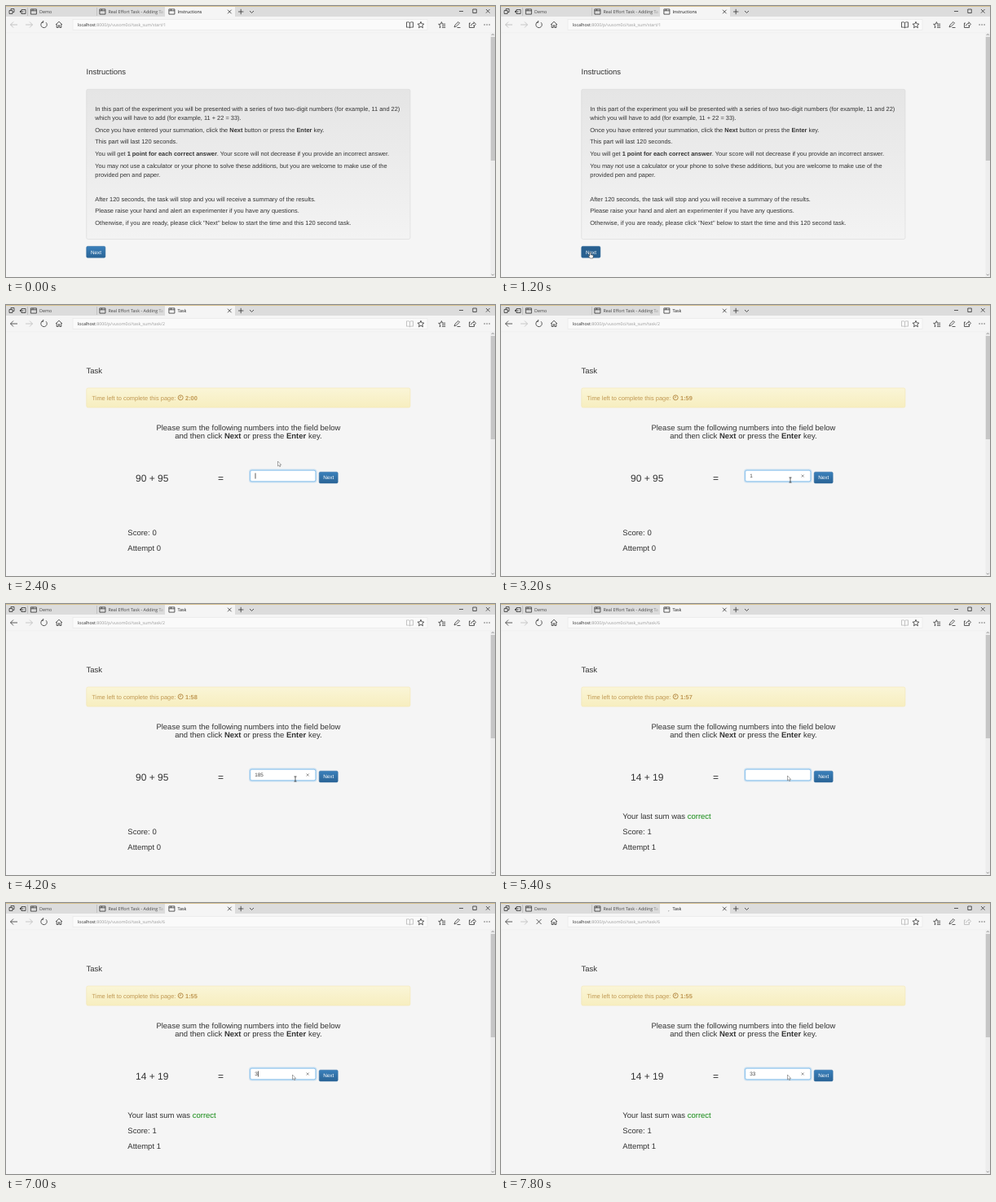
Animation, 600 px wide and 333 px high, one loop 8 s. Source, as an HTML page:

```html
<!DOCTYPE html>
<html lang="en">
<head>
<meta charset="utf-8">
<title>Adding task</title>
<style>
html, body { margin: 0; width: 100%; height: 100%; overflow: hidden; background: #f5f5f5; }
svg { display: block; width: 100vw; height: 100vh; }
text { font: 7.43px "Liberation Sans", Arial, sans-serif; fill: #333; text-rendering: geometricPrecision; white-space: pre; }
b, .b { font-weight: bold; }
.big { font-size: 9.5px; }
.sum { font-size: 12px; }
.small { font-size: 6.37px; }
.ui { font: 5.4px "Open Sans", "Noto Sans", sans-serif; fill: #444; }
.mid { text-anchor: middle; }
.line { fill: none; stroke: #333; stroke-width: .8; }
.pale { stroke: #bbb; }
.tan { fill: #c09853; }
</style>
</head>
<body>
<svg viewBox="0 0 600 333">
<defs>
  <linearGradient id="well" x2="0" y2="1"><stop stop-color="#e5e5e5"/><stop offset="1" stop-color="#f3f3f3"/></linearGradient>
  <linearGradient id="alert" x2="0" y2="1"><stop stop-color="#faf5d7"/><stop offset="1" stop-color="#f7eebf"/></linearGradient>
  <linearGradient id="blue" x2="0" y2="1"><stop stop-color="#3a80bb"/><stop offset="1" stop-color="#2a6496"/></linearGradient>
  <linearGradient id="fade" x2="1" y2="0"><stop stop-color="#dcdcdc" stop-opacity="0"/><stop offset="1" stop-color="#dcdcdc"/></linearGradient>
  <path id="sheet" class="line" d="M.4.4h7v6.2h-7zM.4 2.3h7M3 .4v1.9"/>
</defs>

<rect width="600" height="333" fill="#f5f5f5"/>

<!-- browser frame -->
<rect width="600" height="13" fill="#dcdcdc"/>
<rect x="195" width="86" height="14" fill="#f5f5f5"/>
<rect width="600" height="1" fill="#d5c090"/>
<path class="line pale" d="M26.5 2v10M111.5 2v10" stroke-width=".5"/>
<path class="line" d="M4 5.5h4v4h-4zM6 5.5v-2h4v4h-2M17 6.5h2v-2h5v5h-5v-1.500M21.500 7h-4.500l1.500-1.500M17 7l1.500 1.500" stroke-width=".7"/>
<use href="#sheet" x="30" y="3.500"/>
<use href="#sheet" x="114.500" y="3.500"/>
<use href="#sheet" x="199.500" y="3.500" id="tabIcon"/>
<path id="spinner" class="line" stroke-width="1"/>
<text class="ui" x="41" y="9">Demo</text>
<text class="ui" x="125.500" y="9">Real Effort Task - Adding Ta</text>
<rect x="185" y="2" width="10" height="10" fill="url(#fade)"/>
<text class="ui" x="210.500" y="9" id="tab" style="fill:#111"></text>
<path class="line" d="M272 4.700l4.600 4.600m0-4.600l-4.600 4.600M285 7h6.400M288.200 3.800v6.400M299 6l2.500 2.500l2.500-2.500M556 6.500h5M572.800 4h4.500v4.500h-4.500zM589 4l4.600 4.600m0-4.600l-4.600 4.600" stroke-width=".7"/>
<rect x="82" y="16.500" width="435" height="13" fill="#fafafa" stroke="#e6e6e6" stroke-width=".6"/>
<text class="ui" x="88" y="25" style="font-size:5.220px;fill:#999"><tspan fill="#222">localhost</tspan><tspan id="url"></tspan></text>
<path id="back" class="line" d="M14 23H5.500l3.500-3.500M5.500 23l3.500 3.500"/>
<path class="line pale" d="M24 23h8.500l-3.500-3.500M32.500 23l-3.500 3.500"/>
<path id="reload" class="line" d="M49 20.200a3.700 3.700 0 1 1-4 -.6M45.700 18v2.300h-2.300"/>
<path id="stop" class="line" d="M43.500 20l6 6m0-6l-6 6" stroke-width="1"/>
<path class="line" d="M61 23l4-3.800l4 3.800M62.200 22.200v4.300h2v-2.700h1.600v2.700h2v-4.300"/>
<path id="book" class="line" d="M495.500 20.500c-1-.8-2.500-.8-4-.6v6.300c1.500-.2 3-.2 4 .6c1-.8 2.500-.8 4-.6v-6.300c-1.500-.2-3-.2-4 .6zv6.300"/>
<path class="line" d="M509 19.300l1.100 2.600l2.800.2l-2.100 1.900l.7 2.800l-2.500-1.500l-2.500 1.500l.7-2.800l-2.100-1.900l2.800-.2zM533.500 26l-1.400.8l.6-2.700l-2-1.700l2.700-.2l1-2.600l1 2.400M535 22.200h4.200M535 24.300h4.200M535 26.400h4.200M550 26l1-2.700l4-3.800l1.600 1.600l-4 3.800zM553.500 26.500h4"/>
<path id="share" class="line" d="M570 21h-1.500v5.500h6v-2M570.500 24.500c.3-2.300 1.700-3 3.500-3v-1.800l2.500 2.700l-2.500 2.600v-1.700"/>
<path d="M586.500 22.600h1.200v1h-1.200zm3 0h1.200v1h-1.200zm3 0h1.200v1h-1.200z" fill="#333"/>
<path d="M0 33H600" stroke="#ececec" stroke-width=".6"/>
<rect x="594.500" y="33" width="5.500" height="300" fill="#ededed"/>
<path class="line" d="M595.800 36l1.500-1.500l1.500 1.500M595.800 329.500l1.500 1.500l1.500-1.500" stroke-width=".6" style="stroke:#777"/>
<rect id="thumb" x="594.800" y="38" width="5.200" fill="#c6c6c6"/>

<text class="big" id="title" x="98.500" y="83.500"></text>

<g id="intro">
  <rect x="98.700" y="102.300" width="397.300" height="184.200" rx="2" fill="url(#well)" stroke="#d9d9d9" stroke-width=".6"/>
  <g id="copy"></g>
  <rect id="start" x="98.700" y="295.300" width="23.200" height="14" rx="1.600" stroke="#2b669a" stroke-width=".5"/>
  <text class="small" x="103.900" y="304.600" style="fill:#fff">Next</text>
</g>

<g id="task">
  <rect x="98.700" y="102" width="397.300" height="24" rx="2" fill="url(#alert)" stroke="#f3e6b8" stroke-width=".6"/>
  <text class="tan" x="105.500" y="116.800" style="fill:#c09853">Time left to complete this page:</text>
  <circle cx="214.200" cy="113.800" r="3" class="line" style="stroke:#b98f4a;stroke-width:1"/>
  <path d="M214.200 111.800v2.200h-1.600" class="line" style="stroke:#b98f4a"/>
  <text id="clock" class="b" x="220" y="116.800" style="fill:#c09853"></text>
  <text class="big mid" x="297.400" y="153.800">Please sum the following numbers into the field below</text>
  <text class="big mid" x="297.400" y="164.300">and then click <tspan class="b">Next</tspan> or press the <tspan class="b">Enter</tspan> key.</text>
  <text id="sum" class="sum" x="159" y="217.300"></text>
  <text class="sum" x="260" y="217.300">=</text>
  <rect x="299" y="202.500" width="81.500" height="15" rx="2.500" fill="none" stroke="#66afe9" stroke-opacity=".3" stroke-width="2"/>
  <rect x="299.700" y="203.200" width="80.200" height="13.600" rx="2" fill="#fff" stroke="#66afe9" stroke-width=".7"/>
  <text id="field" class="small" x="305.300" y="212.200" style="fill:#444"></text>
  <path id="caret" class="line" d="M0 206.500v7" stroke-width=".7"/>
  <path id="clear" class="line" d="M368.700 208.500l3 3m0-3l-3 3" stroke-width=".6" style="stroke:#777"/>
  <rect x="384.200" y="205.200" width="23" height="13.800" rx="1.600" fill="url(#blue)" stroke="#2b669a" stroke-width=".5"/>
  <text class="small" x="389.200" y="214.300" style="fill:#fff">Next</text>
  <text id="verdict" class="big" x="149.300" y="263.800">Your last sum was <tspan fill="#148a14">correct</tspan></text>
  <text id="score" class="big" x="149.300" y="283"></text>
  <text id="attempt" class="big" x="149.300" y="301.800"></text>
  <g id="tip">
    <rect x="296" y="217.200" width="72" height="17.300" fill="#fff" stroke="#555" stroke-width=".8"/>
    <text class="ui" x="300.300" y="228" style="font-size:5.950px">This is a required field</text>
  </g>
</g>

<g id="mouse">
  <path id="arrow" d="M0 0v6l1.400-1.200l.9 2l1-.5l-.9-1.900h1.800z" fill="#fff" stroke="#555" stroke-width=".5"/>
  <path id="beam" class="line" d="M-1.500-3h3M0-3v6M-1.500 3h3" stroke-width=".7"/>
  <path id="hand" d="M-.7 0q.7-.8 1.400 0v2.600l2.600.6q.6.200.5 1l-.6 2.800h-3.400l-2.200-3q.2-.9 1.700.2z" fill="#fff" stroke="#222" stroke-width=".5"/>
</g>
</svg>
<script>
const LOOP = 8000, STEP = 200;
const el = id => document.getElementById(id);
const show = (id, on) => { el(id).style.display = on ? "" : "none"; };
const put = (id, s) => { el(id).textContent = s; };
const ink = (id, on) => { el(id).style.stroke = on ? "#333" : "#b5b5b5"; };

// [baseline, text]; asterisks mark bold
const copy = [
  [129.4, "In this part of the experiment you will be presented with a series of two two-digit numbers (for example, 11 and 22)"],
  [139.9, "which you will have to add (for example, 11 + 22 = 33)."],
  [154.600, "Once you have entered your summation, click the *Next* button or press the *Enter* key."],
  [169.400, "This part will last 120 seconds."],
  [184.300, "You will get *1 point for each correct answer*. Your score will not decrease if you provide an incorrect answer."],
  [199.100, "You may not use a calculator or your phone to solve these additions, but you are welcome to make use of the"],
  [209.700, "provided pen and paper."],
  [239.600, "After 120 seconds, the task will stop and you will receive a summary of the results."],
  [254.400, "Please raise your hand and alert an experimenter if you have any questions."],
  [269.200, "Otherwise, if you are ready, please click \"Next\" below to start the time and this 120 second task."]
];
el("copy").innerHTML = copy.map(([y, s]) =>
  `<text x="109.3" y="${y}">${s.replace(/\*(.+?)\*/g, '<tspan class="b">$1</tspan>')}</text>`).join("");

// latest [time, value] pair that has begun
const at = (t, list) => list.reduce((v, [start, next]) => t >= start ? next : v, list[0][1]);

const path = [[200, 452, 190], [1000, 109.5, 303], [1400, 109.5, 303], [2200, 183, 206],
  [2400, 333.5, 192], [2600, 334, 194], [3200, 355, 215], [5000, 355, 215], [5200, 351.5, 211], [LOOP, 351.5, 211]];
const shapes = [[0, "beam"], [800, "arrow"], [1000, "hand"], [1600, "arrow"], [1800, "beam"],
  [2400, "arrow"], [3000, "beam"], [5200, "arrow"]];
const typed = [[0, ""], [3200, "1"], [3400, "18"], [3600, "185"], [5200, ""], [7000, "3"], [7200, "33"]];
const clock = [[0, "2:00"], [3000, "1:59"], [4000, "1:58"], [5200, "1:57"], [6000, "1:56"], [7000, "1:55"]];

function mouse(t) {
  show("mouse", t >= path[0][0]);
  const i = Math.max(1, path.findIndex(p => p[0] >= t));
  const [t0, x0, y0] = path[i - 1], [t1, x1, y1] = path[i];
  const k = Math.max(0, (t - t0) / (t1 - t0));
  el("mouse").setAttribute("transform", `translate(${x0 + (x1 - x0) * k} ${y0 + (y1 - y0) * k})`);
  const shape = at(t, shapes);
  for (const id of ["arrow", "beam", "hand"]) show(id, id === shape);
}

function spin(t) {
  const a = (t % 1000) / 1000 * 2 * Math.PI + 2.01, r = 3.7;
  const len = t > 7000 ? .25 : 1.4;
  const point = a => `${203.3 + r * Math.cos(a)} ${7 + r * Math.sin(a)}`;
  el("spinner").setAttribute("d", `M${point(a)}A${r} ${r} 0 0 1 ${point(a + len)}`);
}

function draw(t) {
  const intro = t < 2400, second = t >= 5200;
  const loading = (t >= 1600 && t < 2400) || (t >= 4400 && t < 5200) || t >= 7600;
  const value = at(t, typed);

  show("intro", intro);
  show("task", !intro);
  put("title", intro ? "Instructions" : "Task");
  put("tab", intro ? "Instructions" : "Task");
  put("url", ":8000/p/vusom0ci/task_sum/" + (intro ? "start/1" : second ? "task/6" : "task/2"));
  el("thumb").setAttribute("height", intro ? 152 : 127);
  el("start").setAttribute("fill", t >= 1000 && t < 1600 ? "#286090" : "url(#blue)");

  show("tabIcon", !loading);
  show("spinner", loading);
  show("reload", !loading);
  show("stop", loading);
  ink("back", t >= 1600);
  ink("book", t < 1600);
  ink("share", !loading);
  spin(t);

  put("clock", at(t, clock));
  put("sum", second ? "14 + 19" : "90 + 95");
  put("field", value);
  show("clear", value);
  show("caret", t < 6200 ? loading || (t - 2400) % 1200 < 600 : t >= 7000 && t < 7600);
  el("caret").setAttribute("transform", `translate(${306 + value.length * 3.45})`);
  show("verdict", second);
  put("score", "Score: " + +second);
  put("attempt", "Attempt " + +second);
  show("tip", t >= 5800 && t < 7000);
  mouse(t);
}

function frame() {
  const t = performance.now() % LOOP;
  draw(Math.floor(t / STEP) * STEP);
  requestAnimationFrame(frame);
}
frame();
</script>
</body>
</html>
```
